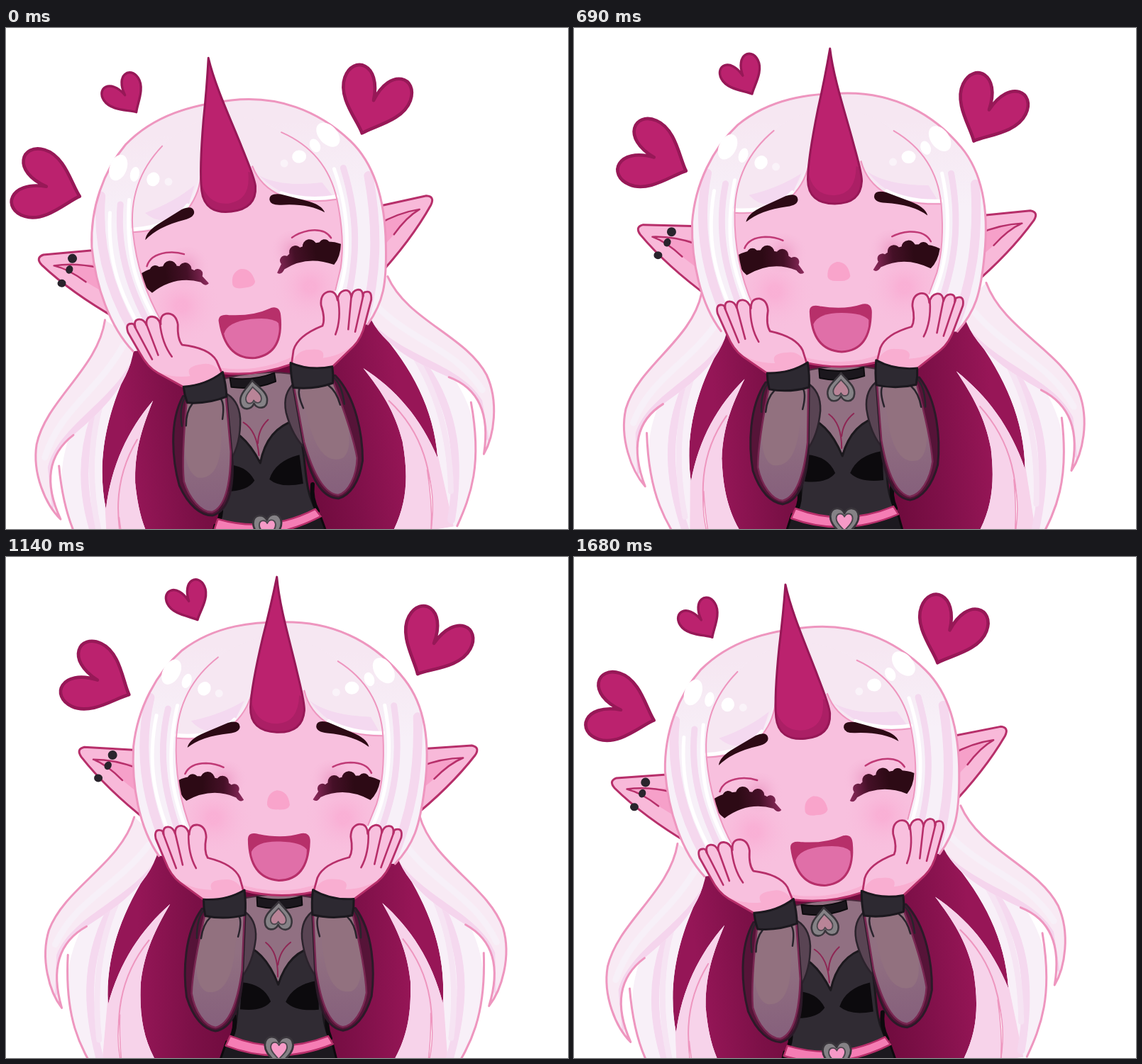
Write an HTML page with a canvas that moves like this. It is 792 by 707 pixels and loops after 1.74 s.

```html
<!DOCTYPE html>
<html lang="en">
<head>
<meta charset="utf-8">
<title>Happy sway</title>
<style>
html, body { margin: 0; width: 100%; height: 100%; overflow: hidden; background: #fff; }
canvas { display: block; width: 792px; height: 707px; }
</style>
</head>
<body>
<canvas id="stage" width="792" height="707"></canvas>
<script>
const ctx = document.getElementById('stage').getContext('2d');
const RAD = Math.PI / 180, LOOP = 1740;
const LINE = '#b72f6a', HAIR_LINE = '#ee96bf', INK = '#29242c';
const MAGENTA = '#bb226e', BERRY = '#971857', SKIN = '#f8c0de';

// Each key is [step, value]; one extra key on both sides keeps the loop smooth.
const PHASE = [[-1, -29], [0, 0], [4, 109.5], [8, 203], [12, 285], [17, 384], [23, 514], [30, 691], [31, 720], [35, 829]];
const DRAG = [[-1, -4.5], [0, -7.5], [4, -7.5], [8, 22.5], [12, 16.5], [17, -27], [23, 18.5], [30, -4.5], [31, -7.5], [35, -7.5]];

function curve(keys, n) {
  let i = 1;
  while (n >= keys[i + 1][0]) i++;
  const [a, b, c, d] = keys.slice(i - 1, i + 3);
  const span = c[0] - b[0], u = (n - b[0]) / span;
  const m0 = (c[1] - a[1]) / (c[0] - a[0]) * span;
  const m1 = (d[1] - b[1]) / (d[0] - b[0]) * span;
  const rise = c[1] - b[1];
  return b[1] + u * (m0 + u * (3 * rise - 2 * m0 - m1 + u * (m0 + m1 - 2 * rise)));
}

// Eight steps every 450 ms, the fifth one half as long.
function stepAt(t) {
  const rest = t % 450;
  return 8 * Math.floor(t / 450) + Math.floor((rest < 270 ? rest : rest + 30) / 60);
}

function shape(d, fill, stroke, width = 3) {
  const path = new Path2D(d);
  if (fill) { ctx.fillStyle = fill; ctx.fill(path); }
  if (stroke) { ctx.strokeStyle = stroke; ctx.lineWidth = width; ctx.stroke(path); }
}

function oval(x, y, rx, ry, fill, turn = 0) {
  ctx.beginPath();
  ctx.ellipse(x, y, rx, ry, turn * RAD, 0, 7);
  ctx.fillStyle = fill;
  ctx.fill();
}

function ramp(x0, y0, x1, y1, ...colors) {
  const g = ctx.createLinearGradient(x0, y0, x1, y1);
  colors.forEach((c, i) => g.addColorStop(i / (colors.length - 1), c));
  return g;
}

function layer(draw) { ctx.save(); draw(); ctx.restore(); }

function turnAround(x, y, deg, bob = 0) {
  ctx.translate(x, y + bob);
  ctx.rotate(deg * RAD);
  ctx.translate(-x, -y);
}

function both(x, y, tilt, draw) {
  draw();
  layer(() => {
    ctx.translate(x, y);
    ctx.rotate(tilt * RAD);
    ctx.scale(-1, 1);
    ctx.translate(-x, -y);
    draw();
  });
}

function clipped(d, draw) {
  layer(() => { ctx.clip(new Path2D(d)); draw(); });
}

function backHair() {
  shape('M215 390 L555 390 L565 440 C602 500 625 560 621 630 L570 780 L200 780 L149 630 C145 560 168 500 205 440Z',
    ramp(190, 0, 580, 0, '#951657', '#7c1047', '#6c0a3b', '#6c0a3b', '#7f1049', '#971657'));
  both(385, 500, 0, () => {
    const mass = 'M184 380 C150 470 95 520 92 595 C90 650 110 690 135 730 L230 730 C200 690 193 650 195 600 ' +
      'C200 555 215 525 235.5 489 C195 525 165 570 149 631 C145 560 168 500 206 440 L215 390Z';
    shape(mass, '#f8f0f8');
    clipped(mass, () => {
      shape('M240 485 C185 530 150 580 148 630 L140 730 L240 730 L195 600Z', '#f7d3ea');
      shape('M150 500 C115 570 118 640 142 720', null, '#f5d9ef', 11);
      shape('M190 430 C145 500 125 580 137 680', null, '#f6e4f3', 8);
    });
    shape('M92 560 C88 650 110 690 135 730', null, HAIR_LINE, 3);
    shape('M206 540 C166 590 155 650 172 730', null, HAIR_LINE, 2);
    shape('M166 645 C161 675 164 700 171 725 Q165 690 166 645', '#fff', HAIR_LINE, 1.5);
    const edge = 'M184 366 C165 432 87 465 65 525 C53 565 66 612 84 635 C66 575 82 540 118 520';
    const lock = edge + ' C165 490 210 460 222 400Z';
    shape(lock, '#f8eaf4');
    clipped(lock, () => {
      shape('M225 410 C190 480 100 500 76 560 L74 620 L140 530 L230 470Z', '#f5d5ed');
      shape('M205 405 C160 465 105 480 74 545', null, '#f7f0f8', 9);
    });
    shape(edge, null, HAIR_LINE, 3);
  });
}

function hollowHeart(x, y, size, up, inside) {
  layer(() => {
    ctx.translate(x, y);
    ctx.scale(size, up ? -size : size);
    const d = 'M0 21 C-7 12 -19 4 -18 -7 C-17 -19 -4 -19 0 -10 C4 -19 17 -19 18 -7 C19 4 7 12 0 21Z';
    shape(d, '#858286', '#39353b', 2.5);
    ctx.scale(.58, .58);
    shape(d, inside, '#4c474e', 3);
  });
}

function body() {
  shape('M318 486 Q375 470 432 482 L442 600 L315 600Z', '#917082', '#4b2a3d', 2);
  shape('M359 545 Q377 558 377 593 M394 544 Q379 556 377 576', null, '#8e2654', 2);
  shape('M322 548 C350 552 367 577 378 604 C386 575 402 554 432 548 C448 600 432 640 452 678 L475 770 L290 770 ' +
    'L314 680 C331 640 312 590 322 548Z', '#302b33', '#1b181d', 3);
  shape('M327 602 Q358 604 368 628 Q357 643 325 640Z M434 597 Q399 603 389 628 Q403 642 436 638Z', '#0c0a0d');
  shape('M449 640 Q445 660 453 678 M317 650 Q320 668 313 681', null, '#0c0a0d', 6);
  shape('M307 686 Q380 712 456 684 L480 770 L280 770Z', '#1c191f', '#0c0a0d');
  shape('M312 678 Q380 704 450 675 L457 686 Q380 719 306 692Z', '#f57db4', LINE, 2.5);
  hollowHeart(381, 696, 1.1, false, '#f69ac7');
  shape('M345 481 Q376 488 408 479 L409 491 Q378 501 346 494Z', '#1b171d', '#0d0b0e', 2);
  hollowHeart(376, 509, 1.05, true, '#b98497');
}

const CAP_EDGE = 'M207 428 C178 390 165 330 166 275 C170 220 195 170 230 137 C275 100 330 92 385 92 ' +
  'C450 92 505 120 545 168 C580 210 583 270 578 320 C573 375 565 400 540 428';
const FACE = 'M226 261 Q278 265 307 237 Q327 216 331 188 L404 188 Q412 218 440 234 Q473 250 517 248 ' +
  'Q522 305 511 345 Q495 385 484 412 Q470 462 425 472 Q375 484 325 472 Q275 455 252 392 Q225 330 226 261Z';

function eye() {
  const dark = ramp(235, 0, 325, 0, '#2d0a15', '#2d0a15', '#451027', '#912c60');
  const glow = ctx.createRadialGradient(295, 318, 4, 295, 318, 34);
  glow.addColorStop(0, '#e98fbd99');
  glow.addColorStop(1, '#f8c0de00');
  oval(295, 318, 34, 28, glow);
  shape('M228 322 Q243 312 272 314 Q302 316 316 334 L324 345 Q319 350 313 342 Q278 328 243 349 Q232 340 228 322Z', dark);
  [[251, 319, 8], [272, 317, 10], [293, 321, 9], [310, 330, 7]].forEach(([x, y, r]) => oval(x, y, r, r, dark));
  shape('M240 311 Q246 296 269 295 Q283 295 294 300', null, '#c03a76', 2.5);
}

function head() {
  both(371, 300, -4.3, () => {
    shape('M175 280 L97 278 Q85 281 93 292 Q130 336 190 380Z', '#f8b9d9', LINE, 3);
    shape('M185 300 L118 297 L185 348Z', '#f6a0c9');
    shape('M172 305 Q140 294 110 295 Q130 302 152 323', null, LINE, 2.5);
  });
  oval(137, 288, 6.5, 6.5, INK);
  oval(131, 303, 5, 6, INK, 25);
  oval(118, 321, 6, 5.5, INK);

  shape(CAP_EDGE, ramp(0, 130, 0, 250, '#f6e7f2', '#f7f0f8'));
  clipped(CAP_EDGE, () => {
    shape('M281 145 Q225 190 226 262 Q300 270 331 186 L404 186 Q425 260 517 248 Q510 185 450 145 Q365 80 281 145Z', '#f6e7f2');
    shape('M320 205 Q290 225 246 236 Q270 262 306 237Z M412 202 Q440 222 499 222 L515 248 Q450 250 412 202Z', '#f4d9f0');
    shape('M187 205 C172 280 185 350 220 420 M565 220 C570 300 560 360 535 425', null, '#f5d8ee', 13);
    shape('M213 220 C199 290 215 350 240 410 M531 205 C547 290 532 350 505 420', null, '#f4d9ef', 9);
    shape('M226 215 C210 300 225 345 248 400 M518 205 C535 280 523 345 500 390 M197 230 C185 300 200 350 222 400', null, '#fff', 5);
    shape('M226 257 Q280 260 307 232 M440 230 Q473 246 517 244', null, '#fff', 5);
  });
  shape(CAP_EDGE, null, HAIR_LINE, 3);

  shape(FACE, SKIN);
  clipped(FACE, () => {
    shape('M270 440 Q320 472 375 471 Q440 470 485 425 L485 490 L270 490Z', '#f8afd2');
    [[282, 372], [465, 366]].forEach(([x, y]) => {
      const blush = ctx.createRadialGradient(x, y, 8, x, y, 56);
      blush.addColorStop(0, '#faa6d099');
      blush.addColorStop(1, '#f8c0de00');
      oval(x, y, 56, 56, blush);
    });
    both(371, 300, -4.3, eye);
  });
  shape('M270 442 Q290 466 325 472 Q375 484 425 472 Q460 464 473 438', null, LINE, 3);
  shape('M252 392 Q225 330 226 261 Q278 265 307 237 Q327 216 331 188 M404 188 Q412 218 440 234 Q473 250 517 248 ' +
    'Q522 305 511 345 L500 375 M226 261 Q227 190 281 145 M517 248 Q510 180 450 145', null, HAIR_LINE, 2);

  both(371, 300, -4.3, () =>
    shape('M242 274 Q244 262 266 252 L298 237 Q314 232 315 242 Q315 250 300 252 Q262 257 242 274Z', '#2d0a15'));
  shape('M357 351 Q356 334 370 330 Q386 330 389 350 Q387 358 372 357 Q359 358 357 351Z', '#f9a4cb');

  const mouth = 'M333 400 Q333 391 346 394 Q380 400 407 391 Q418 389 418 401 Q418 455 377 457 Q335 455 333 400Z';
  shape(mouth, '#b7306a');
  clipped(mouth, () => shape('M337 418 Q344 402 377 402 Q407 402 415 412 L415 460 L340 460Z', '#e06fa8'));
  shape(mouth, null, LINE, 3);

  [[216, 168, 12, 19, 27], [238, 180, 6.5, 10.5, 18], [263, 190, 9, 10, 30],
   [515, 156, 13, 20, -36], [495, 169, 7, 10, -22], [471, 182, 10, 9, 0]].forEach(([x, y, rx, ry, a]) => oval(x, y, rx, ry, '#fff', a));
  oval(284, 196, 5.5, 5.5, '#faf3f9');
  oval(449, 189, 5.5, 5.5, '#faf3f9');

  const horn = 'M360 29 C365 70 380 115 391 155 C399 185 405 203 405 216 C404 237 392 248 367 248 ' +
    'C343 248 329 237 329 214 C329 190 335 155 343 115 Q353 70 360 29Z';
  shape(horn, MAGENTA);
  clipped(horn, () => shape('M329 200 Q335 237 367 236 Q397 234 397 195 L410 200 L410 255 L325 255Z', '#ab1f65'));
  shape(horn, null, BERRY, 3);
  heart(115, 184, 1, -67);
  heart(583, 118, 1, 26);
  heart(238, 69, .59, -27);
}

function heart(x, y, size, turn) {
  layer(() => {
    ctx.translate(x, y);
    ctx.rotate(turn * RAD);
    ctx.scale(size, size);
    shape('M0 46 C-12 31 -49 10 -49 -20 C-49 -54 -7 -57 0 -3 C7 -57 49 -54 49 -20 C49 10 12 31 0 46Z',
      MAGENTA, BERRY, 3 + 1.6 / size);
  });
}

function arm() {
  shape('M327 500 Q348 512 347 540 Q344 575 328 596Z', '#594453', '#2b232c', 2.5);
  shape('M270 500 C246 535 246 590 252 625 C262 655 278 670 294 672 C316 668 327 640 330 600 L331 505Z', '#4f1536d9', '#2b1a28', 3);
  const sleeve = 'M275 505 C266 550 259 590 259 620 C264 645 279 666 294 667 C314 662 324 630 329 585 L330 505Z';
  shape(sleeve, ramp(0, 560, 0, 665, '#917081', '#86607c'));
  clipped(sleeve, () => shape('M275 505 C262 550 258 608 280 617 Q312 622 318 560 L322 505Z', '#92717f'));
  shape(sleeve, null, '#792752', 2.5);
  shape('M282 512 Q272 522 270 542 M323 510 Q327 518 322 538 M272 503 Q263 515 264 542', null, INK, 2.5);
  const hand = 'M273 488 L238 464 Q224 454 216 434 L202 403 Q199 390 208 391 Q212 391 213 397 Q211 386 219 386 ' +
    'Q226 386 229 395 Q229 383 238 384 Q246 385 249 396 Q249 381 261 382 Q272 384 273 399 Q270 419 276 428 ' +
    'Q313 436 322 455 L328 474 Q305 487 273 488Z';
  shape(hand, SKIN);
  clipped(hand, () => shape('M225 453 Q250 474 283 473 Q276 459 300 458 Q318 455 329 476 L280 495Z', '#f9aed1'));
  shape(hand, null, LINE, 2.8);
  shape('M212 395 L232 444 M229 394 L241 439 M248 394 Q248 423 260 443', null, LINE, 2.6);
  shape('M272 487 Q304 488 329 472 Q332 490 331 507 Q303 515 275 510 Q272 498 272 487Z', '#2d2931', '#1b181e', 3);
}

function draw(now) {
  const n = stepAt(now % LOOP);
  const sway = .025 - 1.025 * Math.cos(curve(PHASE, n) * RAD);
  const tilt = 8.8 * sway, lean = tilt + 2.18;
  const dip = sway * sway, drag = curve(DRAG, n) / 430;

  ctx.setTransform(1, 0, 0, 1, 0, 0);
  ctx.fillStyle = '#fff';
  ctx.fillRect(0, 0, 792, 707);
  ctx.lineCap = ctx.lineJoin = 'round';
  layer(() => {
    ctx.transform(1, 0, drag, 1, -215 * drag, 0);
    turnAround(385, 650, tilt, 12 * dip);
    backHair();
  });
  layer(() => { turnAround(385, 848, .7 * lean, 9 * dip - .5); body(); });
  layer(() => { turnAround(385, 679, lean, 6.5 * dip - .4); head(); });
  layer(() => {
    turnAround(385.5, 708, .88 * lean, 7 * dip - .4);
    both(378, 492, -3.8, arm);
  });
}

function tick() {
  draw(performance.now());
  requestAnimationFrame(tick);
}
tick();
</script>
</body>
</html>
```
